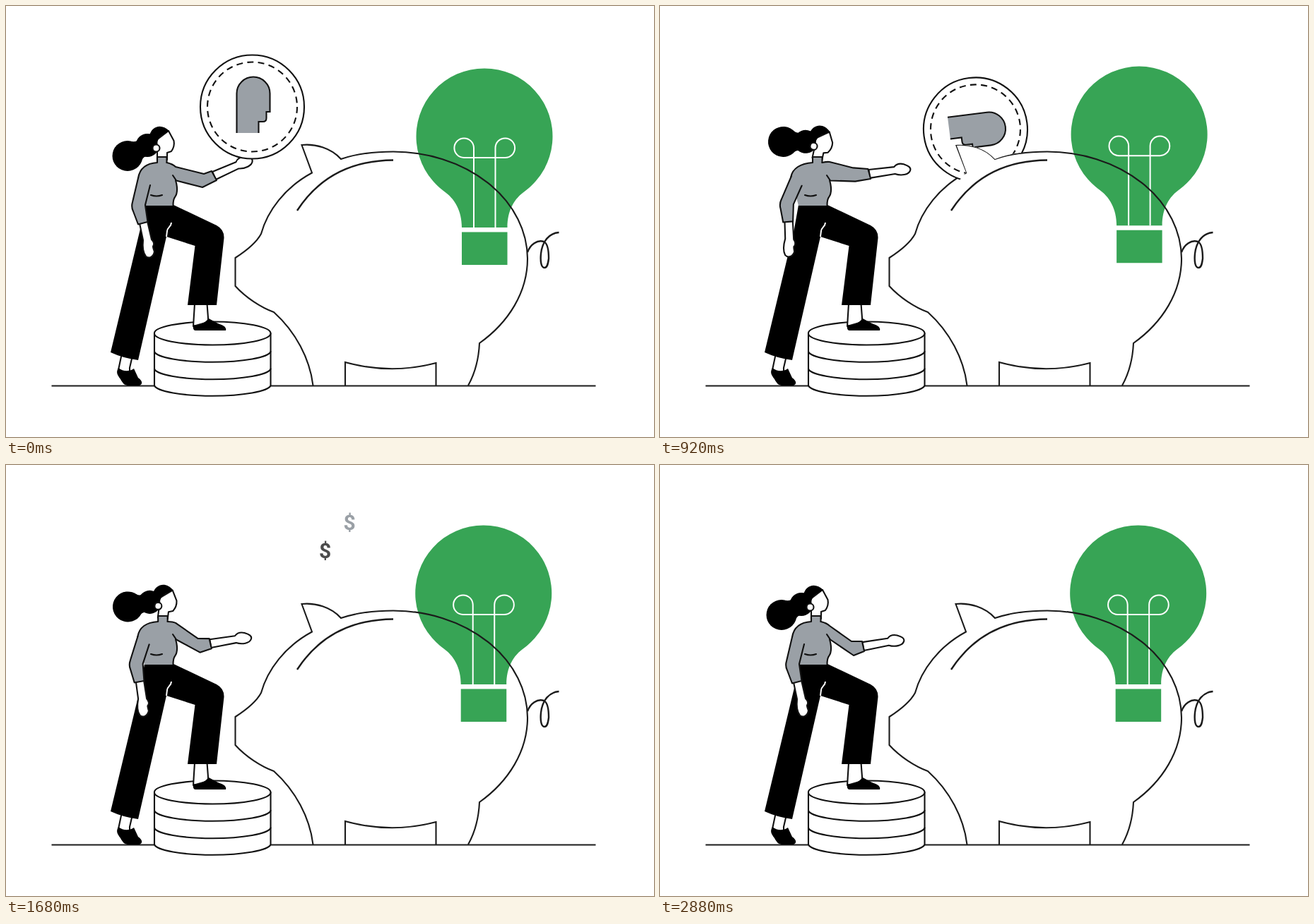
An HTML page for the animation above (2920 ms loop, 917 px wide and 611 px high).

```html
<!DOCTYPE html>
<html lang="en">
<head>
<meta charset="utf-8">
<title>Saving ideas</title>
<style>
  html, body { margin: 0; width: 100%; height: 100%; overflow: hidden; background: #fff; }
  svg { display: block; width: 100vw; height: 100vh; }
  .line { fill: none; stroke: #111; stroke-width: 2.1; stroke-linejoin: round; stroke-linecap: round; }
  .pig { stroke: #1b1b1b; stroke-linejoin: miter; stroke-linecap: butt; }
  .bold { stroke-width: 2.4; }
  .white { fill: #fff; }
  .gray { fill: #9aa0a6; }
  .green { fill: #37a455; }
  .glow { fill: none; stroke: #fff; stroke-width: 2; }
  text { font: bold 30px Roboto, Inter, Arial, sans-serif; text-anchor: middle; }
</style>
</head>
<body>
<svg viewBox="0 0 917 611">
  <defs>
    <clipPath id="abovePig">
      <path d="M0 0H917V207H548C525 206 500 207 474 217C460 201 437 195 418 197L433 236L361 323H0Z"/>
    </clipPath>
  </defs>

  <g id="bulb">
    <path class="green" d="M619 262A96.5 96.5 0 1 1 735 262C719 273 709.5 290 709.5 314H645C645 290 635 273 619 262Z"/>
    <path class="green" d="M645 320.5H709.5V367H645Z"/>
    <path class="glow" d="M662 314V201A13.8 13.8 0 1 0 648 215H706A13.8 13.8 0 1 0 692.5 201V314"/>
  </g>

  <g class="line pig">
    <path d="M64.5 538.5H834.5"/>
    <path d="M434.5 538C430 500 410 462 379 434C360 427 339 413 324.5 397V357C340 347 354 336 361 323C370 290 395 257 433 236.5L418.5 197C437 195 460 201 474 217C500 208 525 206.500 548 206.500A190 152 0 0 1 738 358C738 405 712 448 670 478C669 500 664 520 654 538"/>
    <path d="M480 538V505Q545 523 608.500 506V538"/>
    <path class="bold" d="M412 290C438 250 480 219 548 218.500"/>
    <path class="bold" d="M738 349C742 338 752 331 761 334C768 337 768 352 768 358C767 366 766 371 762 371C757 371 756 361 757 351C759 333 769 322 782.500 321"/>
  </g>

  <g class="line">
    <path class="white" d="M210 464V538A82.500 16 0 0 0 374.500 538V464"/>
    <ellipse class="white" cx="292.200" cy="464" rx="82.300" ry="16.500"/>
    <path d="M210 490A82.500 16 0 0 0 374.500 490M210 514.500A82.500 16 0 0 0 374.500 514.500"/>
  </g>

  <!-- legs -->
  <path class="line white" d="M163 497L159 516L175 522V513L178 500M267 422L265 454L286 448V442L284.500 422"/>
  <path d="M159 513C155 520 158 523 162 529C166 536 168 538 174 538H189C194 536 193 531 187 527L181 514C174 519 165 518 159 513Z"/>
  <path d="M265 452C273 454 280 450 287 443C293 446 299 450 305 452C310 454 312 457 311 460H268Q264 460 265 452Z"/>
  <path d="M196 282H237L298 311Q309 317 308.500 329L298 424H257L267.500 340L227 327L187 502Q165 499 148 491L190 316Z"/>
  <path class="glow" d="M234 307C234 313 228 314 228 319L227 327"/>

  <!-- head -->
  <g id="head">
    <g id="bun"><circle cx="172" cy="212.500" r="21.5"/><path d="M178 192Q187 194 192 184L203 212Q195 211 190 222Z"/></g>
    <circle cx="200" cy="197.500" r="16.5"/>
    <path class="line white" d="M230 177L237.500 191Q239 199 234 206L228 208V218H214V200L213 190Z"/>
    <path d="M203 184C206 170 220 166 231 177C225 181 219 183 216 188L213 196L204 204Z"/>
    <circle class="line white" cx="212.500" cy="201.500" r="5"/>
  </g>

  <!-- body -->
  <path id="torso" class="gray"/>
  <path id="seams" class="line"/>
  <g id="backArm" class="line">
    <path class="white" d="M189 308L194 332C193 341 194 350 198 355C203 359 209 355 210 348C209 345 208 343 208 341C211 337 209 334 206 331L200 305Z"/>
    <path class="gray" d="M187 244L179 278Q177 285 180 291L187 309.500L200.500 306L197 282L204 254"/>
  </g>
  <path id="forearm" class="line white" d="M0 -6L36 -5C40 -9 45 -9 50 -7C56 -4 60 -1 58 3C55 9 44 9 36 5L0 6Z"/>
  <path id="sleeve" class="line gray"/>
  <path class="line" d="M205 268Q213 271 221 268"/>

  <g id="coinClip">
    <g id="coin" class="line">
      <circle class="white" r="73.5"/>
      <circle r="63.5" stroke-dasharray="9 6.346" stroke-linecap="butt"/>
      <path class="gray" stroke-linecap="butt" stroke-linejoin="miter" d="M-22 37V-19A23.500 23.500 0 0 1 25 -19V7H20V16Q20 21 15 21H9V37"/>
    </g>
  </g>

  <text class="cash" transform="translate(481 186.500) rotate(-8 0 -13)" style="font-size:37px" fill="#111">$</text>
  <text class="cash" x="451.500" y="131.500">$</text>
  <text class="cash" x="486" y="92" fill="#9aa0a6">$</text>
</svg>
<script>
const LOOP = 2920, STEP = 40;
const HOP = 720, PEAK = 90, LANDED = 1080;

// Front arm: elbow top, cuff top, cuff bottom, elbow bottom, forearm angle
const HOLD = [280, 238, 291, 234, 298, 247, 278, 257, -24];
const PUSH = [274, 223, 297, 225, 301, 239, 277, 242, -7];
const REST = [271, 250, 286, 250, 289, 264, 274, 270, -10];

const $ = id => document.getElementById(id);
const cash = document.querySelectorAll('.cash');
const move = (id, value) => $(id).setAttribute('transform', value);
const draw = (id, d) => $(id).setAttribute('d', d);

const ramp = (t, from, to) => Math.min(1, Math.max(0, (t - from) / (to - from)));
const ease = (t, from, to) => { const u = ramp(t, from, to); return u * u * (3 - 2 * u); };
const easeOut = (t, from, to, power = 2) => 1 - (1 - ramp(t, from, to)) ** power;
const mix = (a, b, u) => a.map((v, i) => v + (b[i] - v) * u);

function drawBulb(t) {
  const a = 2 * Math.PI * t / LOOP;
  const x = 2.4 * Math.sin(a) + .7 * Math.sin(2 * a) + .4 * (Math.cos(a) - 1);
  move('bulb', `translate(${x} ${-3 * (1 - Math.exp(-t / 330))})`);
}

function drawWoman(t) {
  const lean = ease(t, 0, 610) - ease(t, 1150, 2340);
  const swing = ease(t, 0, 450) - ease(t, 950, 2250);
  move('head', `translate(${2 * lean} ${-lean}) rotate(${12 * lean} 222 215)`);
  move('bun', `rotate(${16 * lean} 200 198)`);
  move('backArm', `rotate(${10 * swing} 198 235)`);

  const left = 214 + 2 * lean, right = left + 13.5, top = 228 - 7 * lean;
  const sx = 187 - 1.6 * swing, sy = 244 - 2 * swing;
  const neck = `M${right} 222V214H${left}V222C198 223 ${sx + 2} 231 ${sx} ${sy}`;
  const side = 'C242 254 244 264 239 271Q236.500 274 236.500 283';
  draw('torso', `${neck}L196 283H236.500L240 247${side}L240 247V${top}Z`);
  draw('seams', `${neck}M240 247${side}`);

  // the coin's weight makes the arm sag on its way to the push
  const lift = ease(t, 0, HOP), sag = 7 * Math.sin(Math.PI * lift);
  const pose = mix(mix(HOLD, PUSH, lift), REST, easeOut(t, HOP, 2300));
  const [ex, ey, cx, cy, dx, dy, fx, fy, turn] = pose;
  draw('sleeve', `M${right} 222Q236 ${(222 + top) / 2 - 1} 240 ${top}L${ex} ${ey + sag / 4}L${cx} ${cy + sag}L${dx} ${dy + sag}L${fx} ${fy}L241 247.500L236 240`);
  move('forearm', `translate(${(cx + dx) / 2} ${(cy + dy) / 2 + sag}) rotate(${turn + sag * .8})`);
}

// Rolls off the hand, hops from the pig's back and drops in behind it
function drawCoin(t) {
  const u = t / 360, s = Math.max(0, t - HOP) / PEAK;
  const roll = 17.25 * u + 8.25 * u * u;
  const y = 143 + 25 * easeOut(t, 0, HOP, 2.6) + 14 * s * (s - 2);
  move('coin', `translate(${348.5 + roll} ${y}) rotate(${.338 * roll ** 1.2})`);
  $('coinClip').style.display = t < LANDED ? '' : 'none';
  $('coinClip').setAttribute('clip-path', s > 1 ? 'url(#abovePig)' : 'none');
}

function drawCash(t) {
  cash.forEach((el, i) => {
    const age = t - LANDED - 120 * i, hold = 270 + 110 * i;
    el.setAttribute('opacity', ramp(age, 0, 55) * (1 - ramp(age, hold, hold + 330)));
  });
}

const start = performance.now();
function tick() {
  const now = (performance.now() - start) % LOOP;
  const t = Math.floor(now / STEP) * STEP;
  [drawBulb, drawWoman, drawCoin, drawCash].forEach(part => part(t));
  requestAnimationFrame(tick);
}
tick();
</script>
</body>
</html>
```
